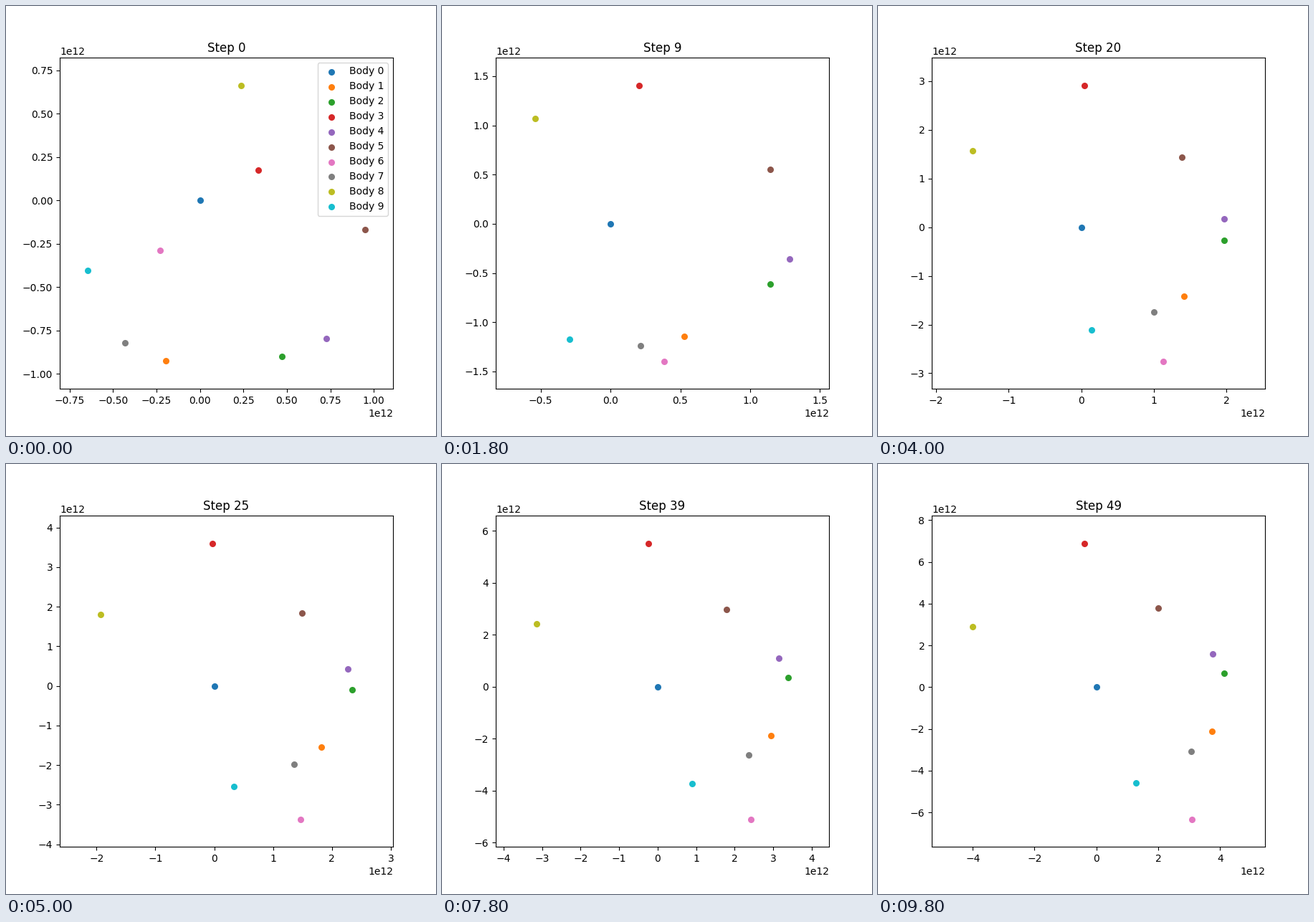
Animation, 600 px wide and 600 px high, one loop 10 s. Source, as a matplotlib script:

```python
import numpy as np
import matplotlib.pyplot as plt
from matplotlib.animation import FuncAnimation

STEPS = 50
INTERVAL = 200
UNIT = 1e12
SPEED = 0.0817  # distance per step at orbit radius 1

# Starting orbit of each body around the central one.
RADII = np.array([0.942, 1.0114, 0.351, 1.0765, 0.962,
                  0.3374, 0.922, 0.6985, 0.755])
ANGLES = np.radians([-107.0, -66.96, 6.11, -51.78, -15.05,
                     -151.17, -122.9, 62.36, -155.26])

fig, ax = plt.subplots(figsize=(6, 6), dpi=100)


def positions(step):
    """Bodies leave their circles along the tangent at circular-orbit speed."""
    travel = SPEED / np.sqrt(RADII) * (step + 1)
    cos, sin = np.cos(ANGLES), np.sin(ANGLES)
    orbiters = np.column_stack([RADII * cos - travel * sin,
                                RADII * sin + travel * cos])
    return UNIT * np.vstack([[0, 0], orbiters])


def fit_view(pos):
    """Pad both axes by a tenth of the wider spread."""
    low, high = pos.min(axis=0), pos.max(axis=0)
    pad = 0.1 * (high - low).max()
    ax.set_xlim(low[0] - pad, high[0] + pad)
    ax.set_ylim(low[1] - pad, high[1] + pad)


def draw(step):
    ax.clear()
    pos = positions(step)
    for i, (x, y) in enumerate(pos):
        ax.scatter(x, y, s=30, color=f"C{i}", label=f"Body {i}")
    fit_view(pos)
    ax.set_title(f"Step {step}")
    if step == 0:
        ax.legend(loc="upper right")


anim = FuncAnimation(fig, draw, frames=STEPS, interval=INTERVAL,
                     init_func=lambda: draw(0), repeat=True, repeat_delay=0)
plt.show()
```
